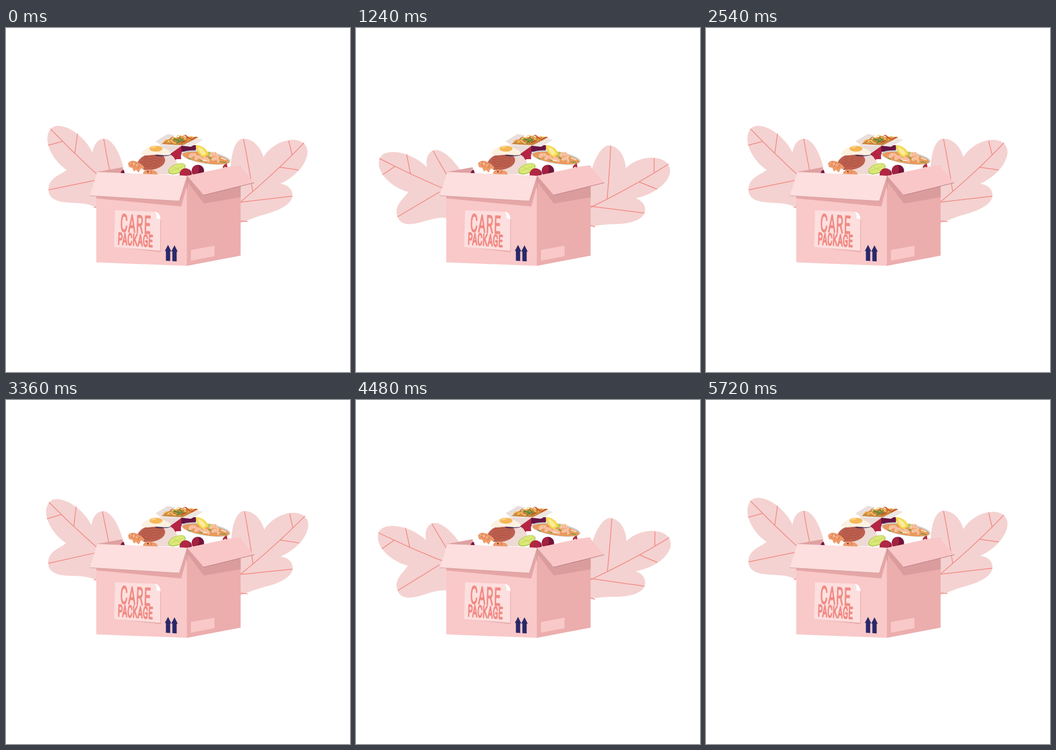
Animation of 640x640 px, one loop 6340 ms. Source, as an HTML page:

```html
<!DOCTYPE html>
<html lang="en">
<head>
<meta charset="utf-8">
<title>Care package</title>
<style>
  html, body { margin: 0; width: 100%; height: 100%; overflow: hidden; background: #fff; }
  svg { display: block; width: 100vw; height: 100vh; }
  .leaf path { fill: #f4d2d1; }
  .leaf .veins { fill: none; stroke: #f28a84; stroke-width: 1.5; stroke-linecap: round; }
  .label text {
    font-family: Roboto, "Liberation Sans", sans-serif; font-weight: 300;
    fill: #f28a84; stroke: #f28a84; stroke-width: 2.6; stroke-linejoin: round;
    vector-effect: non-scaling-stroke;
  }
  .line { fill: none; stroke-linecap: round; stroke-linejoin: round; }
</style>
</head>
<body>
<svg viewBox="0 0 640 640">
  <defs>
    <g id="prawn">
      <path fill="#f8c6a6" d="M-8 3C-9 -4 -3 -7 3 -5C9 -3 10 4 5 6C6 2 3 0 0 1C-3 2 -4 6 -8 3Z"/>
      <path class="line" stroke="#ee9f7c" stroke-width=".9" d="M-5 -3l2 4M0 -5l1 5M6 -3l-3 4"/>
    </g>
  </defs>

  <g class="leaf" id="left">
    <path d="M235 345L168 334C146 322 120 328 98 322C84 318 78 310 79 298C80 286 88 280 95 275C102 271 108 268 113 264C97 254 76 228 77 204C78 190 86 181 98 182C122 183 150 208 161 232C163 216 172 206 183 206C200 207 214 238 219 262L235 300Z"/>
    <path class="veins" d="M83 188Q124 231 168 271L205 302M105 211L79 218M133 197L128 233M182 207Q186 232 193 266L200 290M80 301L168 283M164 334L180 328"/>
  </g>
  <g class="leaf" id="right">
    <path d="M405 345L418 258C419 238 425 206 442 206C461 206 474 223 479 240C490 222 512 208 534 208C550 208 561 217 561 231C560 252 540 276 510 290C524 291 533 300 533 311C533 326 512 338 488 345C468 350 451 357 437 363L405 372Z"/>
    <path class="veins" d="M554 214Q506 265 437 323L415 342M526 210L532 235M509 259L544 264M442 207Q451 252 459 304M532 313L437 324L415 327M410 357L449 360"/>
  </g>

  <!-- inside of the box -->
  <path fill="#dfa1a2" d="M168 268L217 259L219 272Z"/>
  <path fill="#7a1745" d="M213 272C213 265 220 261 226 266L228 273Z"/>

  <!-- noodle carton -->
  <path fill="#eadad6" d="M286 217L327 219L318 240L300 234Z"/>
  <path fill="#b42443" d="M327 219V244L312 244L306 234Z"/>
  <path fill="#681543" d="M326 218L355 218L352 232L326 230Z"/>
  <path fill="#e9dedb" d="M278 211L301 197L315 200L292 214L288 217Z"/>
  <path fill="#c9853b" d="M290 216C297 206 318 200 358 203L346 212L327 219Z"/>
  <g id="noodles" class="line" stroke-width="1.6"></g>
  <path class="line" stroke="#628b3d" stroke-width="3" d="M313 207l9 2M324 205l5 5M319 213l6 -3"/>
  <path class="line" stroke="#c8402f" stroke-width="1.8" d="M334 200l8 6M326 213l8 -3M345 208l9 -5"/>
  <path fill="#eee5e2" d="M286 216L329 218L355 205L367 208L344 221L327 219L322 220L285 219Z"/>

  <!-- rice plate with egg -->
  <path fill="#fff" d="M218 260C240 250 300 250 319 262L316 276L222 274Z"/>
  <path fill="#efd9d5" d="M292 234C306 232 315 240 318 251C318 259 315 266 309 272L262 272Z"/>
  <path fill="#bd604f" d="M242 258C245 244 256 235 271 234C287 233 297 238 296 247C294 259 277 265 260 264Z"/>
  <g id="rice" class="line" stroke="#a64d41" stroke-width="1"></g>
  <path class="line" stroke="#35305f" stroke-width="1.8" d="M279 237Q299 239 307 235"/>
  <path fill="#fdf1df" d="M251 235C252 229 259 225 267 221C279 216 291 221 297 225C305 228 309 233 305 236C295 238 284 234 274 236C265 237 255 238 251 235Z"/>
  <ellipse cx="279" cy="224.5" rx="12" ry="5.6" fill="#f6b756"/>
  <path fill="#fad78b" d="M269 224Q273 219 281 220Q277 224 269 224Z"/>
  <path fill="#ee9a69" d="M227 252C231 245 241 246 247 251C253 253 258 258 258 264L251 261L247 269L242 264L238 267L235 260L229 259Z"/>
  <path fill="#f7bd91" d="M230 251Q239 249 246 257L238 255Z"/>
  <path class="line" stroke="#c9664a" stroke-width="1" d="M235 249l-1 7M242 251l-3 7M249 255l-4 6"/>
  <path fill="#ee9a69" d="M255 270C257 262 267 262 274 265C280 266 282 269 282 273L255 273Z"/>
  <path class="line" stroke="#c9664a" stroke-width="1" d="M263 266l2 4M271 266l-1 4"/>
  <circle cx="264" cy="267" r="1.2" fill="#4a2441"/>
  <circle cx="257" cy="263" r="1" fill="#4a2441"/>

  <!-- soup bowl -->
  <path fill="#fff" d="M326 234L418 248C417 259 401 268 371 275L340 270C329 258 324 246 326 234Z"/>
  <path class="line" stroke="#b42443" stroke-width="1.4" d="M313 241l3 4"/>
  <ellipse cx="372" cy="241" rx="46" ry="11.5" fill="#c9d2d5" transform="rotate(9 372 241)"/>
  <ellipse cx="372" cy="242" rx="44" ry="9.6" fill="#e99a5c" transform="rotate(9 372 242)"/>
  <path fill="#b9c45a" d="M371 235C373 229 381 229 386 234L381 240Z"/>
  <path fill="#f5d94f" d="M353 218C363 217 376 226 376 235L368 241C360 237 353 229 353 218Z"/>
  <path fill="#faec9d" d="M357 221Q367 223 372 234L366 237Q358 230 357 221Z"/>
  <use href="#prawn" x="348" y="238"/>
  <use href="#prawn" transform="translate(358 242) scale(.9)"/>
  <use href="#prawn" transform="translate(388 237) rotate(18) scale(1.1)"/>
  <use href="#prawn" transform="translate(372 245) rotate(10) scale(.9)"/>
  <use href="#prawn" transform="translate(390 245) rotate(18) scale(.9)"/>
  <path class="line" stroke="#7d9c42" stroke-width="2" d="M377 241l4 2M361 246l4 1M400 249l9 1M339 242l4 2"/>
  <path class="line" stroke="#fae0c6" stroke-width="2.4" d="M367 246l7 1M401 242l8 3"/>
  <path fill="#b12d3d" d="M404 261C402 258 405 254 411 252C411 256 413 258 411 262L408 258Z"/>

  <!-- lime and berries -->
  <ellipse cx="318" cy="262" rx="17" ry="9" fill="#a9c851" transform="rotate(-22 318 262)"/>
  <ellipse cx="318" cy="261.5" rx="15.5" ry="7.6" fill="#dbe878" transform="rotate(-22 318 261.5)"/>
  <path class="line" stroke="#c0d55d" d="M306 266L330 257M312 259L324 265"/>
  <circle cx="357" cy="266" r="11.5" fill="#721439"/>
  <path fill="#a5203f" d="M347 271C344 261 351 254 357 255C362 261 358 271 352 276Z"/>
  <circle cx="334" cy="272" r="11" fill="#b02744"/>
  <path fill="#851a3d" d="M335 276C346 274 344 266 340 263C345 264 348 272 344 279Z"/>

  <!-- carton walls and flaps -->
  <path fill="#f9c8c8" d="M168 268L337 275V442.500L168 436Z"/>
  <path fill="#ecadad" d="M336.500 275L436.500 256V423.500L336.500 442.500Z"/>
  <path fill="#e6a6a6" d="M168 313L322 321L337 276V292L326 332L168 317Z"/>
  <path fill="#da9c9d" d="M337 277L436.500 282V315L368 326.500L337 286Z"/>
  <path fill="#fcdfde" d="M170 268L337 275L322.500 322L156 311.500Z"/>
  <path class="line" stroke="#d3a0a2" d="M156 312L322.500 322L337 276"/>
  <path fill="#f9c7c7" d="M337 275L415 258L434 255.500L461.500 288L368 311Z"/>
  <path class="line" stroke="#b97c83" stroke-width="1.2" d="M368 311L461.500 288"/>
  <path class="line" stroke="#c78e91" d="M337 276V299"/>

  <!-- paper label -->
  <g class="label">
    <path fill="#e6a9aa" d="M202 407L287 413V354L288 356V417Z"/>
    <path fill="#fcdfde" d="M203 339L277 342L287 355V414.500L201 407.500Z"/>
    <path fill="#fff" d="M277 342C284 343 287 348 287.500 356L280 354Q281 348 277 342Z"/>
    <text font-size="44" letter-spacing="4" transform="matrix(.46 .034 -.03 1 212.500 378)">CARE</text>
    <text font-size="29" letter-spacing="1.800" transform="matrix(.475 .036 -.03 1 208 402)">PACKAGE</text>
  </g>

  <path id="up" fill="#29296a" d="M301.500 403.500L307.500 415.500H305.500V433.500L297.500 433V415H295.500Z"/>
  <use href="#up" x="12" y=".8"/>
  <path fill="#f9c8c8" d="M344 413L388 405V424.500L344 433Z"/>
</svg>
<script>
  const $ = id => document.getElementById(id);
  const path = (d, stroke) => `<path d="${d}"${stroke ? ` stroke="${stroke}"` : ""}/>`;

  let noodles = "";
  const tones = ["#f0bd58", "#e18a35", "#f3cf79", "#c9752d"];
  for (let i = 0; i < 14; i++) {
    const x = 293 + i * 3.9, y = 213 - 9 * Math.sin(i / 5) + (i % 3) * 2;
    noodles += path(`M${x} ${y}q4 -8 8 -3t7 ${1 + i % 3}`, tones[i % 4]);
  }
  $("noodles").innerHTML = noodles;

  let rice = "";
  for (let row = 0; row < 5; row++)
    for (let i = 0; i < 6; i++) {
      const x = 257 - row * 2 + i * 6.2, y = 240 + row * 4.6 - i * .5;
      rice += path(`M${x} ${y}q3 ${i % 2 ? -3 : 2} 5 0`);
    }
  $("rice").innerHTML = rice;

  // Two sways, each of 23 held poses with an uneven beat.
  const LOOP = 6340, POSES = 23, RISE = 14;
  const sway = (start, first, beat) => {
    const times = [start + first];
    for (let i = 0; times.length < POSES; i++)
      times.push(times[i] + beat[i % beat.length]);
    return times;
  };
  const sways = [
    sway(0, 120, [140, 40, 140, 120, 120]),
    sway(2540, 700, [120, 120, 140, 40, 140])
  ];

  const ease = u => (1 - Math.cos(Math.PI * u)) / 2;
  const lift = k => k < RISE ? ease(k / RISE) : ease((POSES - k) / (POSES - RISE));

  function draw(now) {
    const t = now % LOOP;
    const times = sways[t < 2540 ? 0 : 1];
    const a = lift(times.filter(s => s <= t).length);
    $("left").setAttribute("transform", `rotate(${-21.3 * a} 228 332)`);
    $("right").setAttribute("transform", `rotate(${15.5 * a} 405 345)`);
  }

  const start = performance.now();
  function tick() {
    draw(performance.now() - start);
    requestAnimationFrame(tick);
  }
  tick();
</script>
</body>
</html>
```
